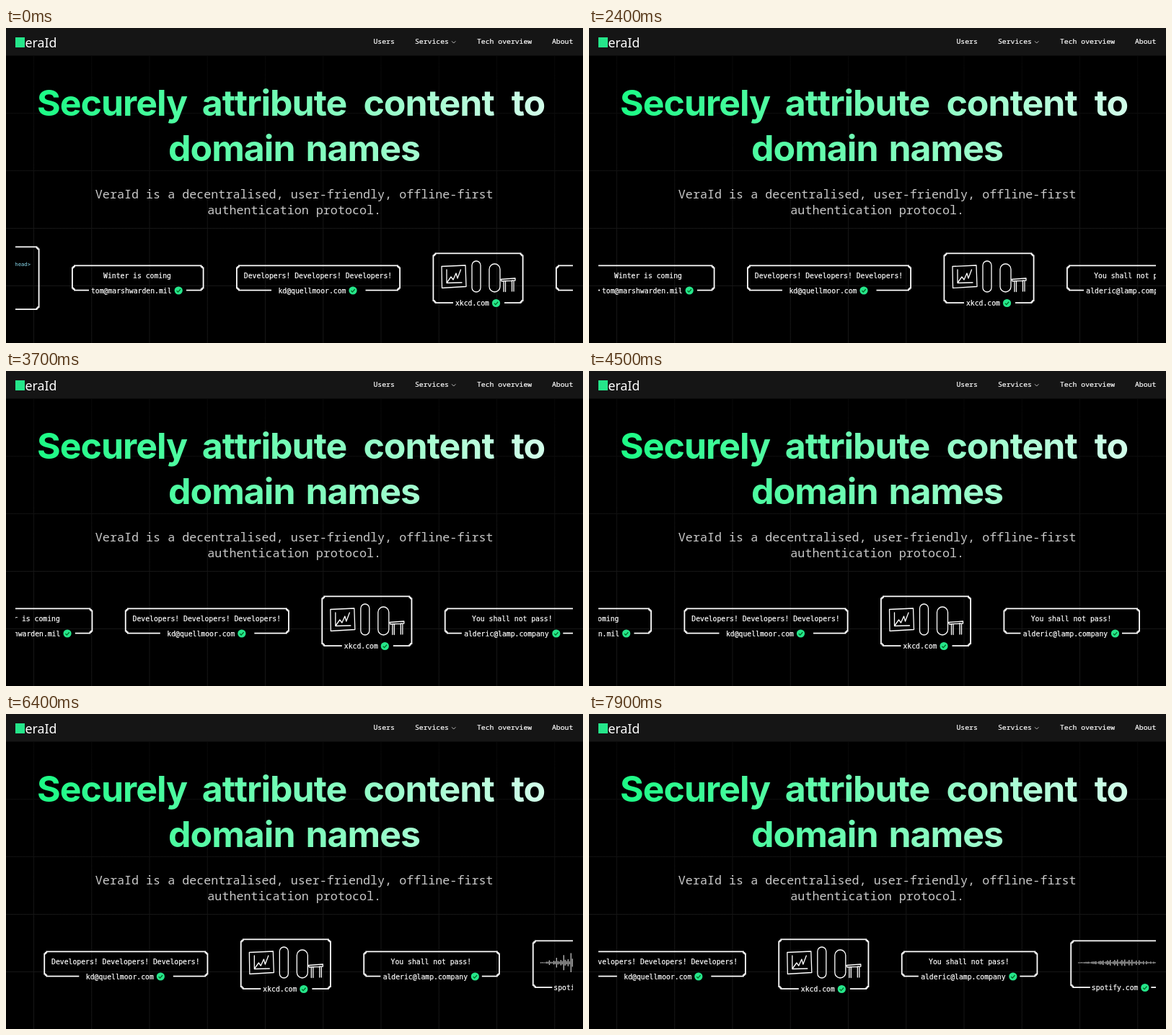
Animation, 800 px wide and 438 px high, one loop 8000 ms. Source, as an HTML page:

```html
<!DOCTYPE html>
<html lang="en">
<head>
<meta charset="utf-8">
<title>Protocol landing page</title>
<style>
  html, body { margin: 0; width: 100%; height: 100%; overflow: hidden; background: #000; }
  svg { display: block; width: 100%; height: 100%; }
  text { white-space: pre; }
  .nav { font: 500 9.78px "Noto Sans Mono", monospace; fill: #fff; stroke: #fff; stroke-width: .2; }
  .brand { font: 500 17.8px "Noto Sans", sans-serif; fill: #fff; }
  .title { font: 700 50px Inter, sans-serif; letter-spacing: -1px; word-spacing: 4px; fill: url(#mint); }
  .sub { font: 16.73px "Noto Sans Mono", monospace; fill: #c9c9c9; }
  .card { font: 9.76px "DejaVu Sans Mono", monospace; fill: #fff; stroke: #fff; stroke-width: .2; }
  .code { font: 7.2px "DejaVu Sans Mono", monospace; fill: #8adcf0; }
  .mid { text-anchor: middle; }
  .line { fill: none; stroke: #fff; stroke-width: 1.3; stroke-linecap: round; stroke-linejoin: round; }
  .frame { fill: none; stroke: #fff; stroke-width: 1.8; }
</style>
</head>
<body>
<svg viewBox="0 0 800 438">
  <defs>
    <linearGradient id="mint" gradientUnits="userSpaceOnUse" x1="50" y1="0" x2="750" y2="0">
      <stop stop-color="#1dfb86"/><stop offset="1" stop-color="#d2fdea"/>
    </linearGradient>
    <linearGradient id="fade" gradientUnits="userSpaceOnUse" x1="0" y1="39" x2="0" y2="290">
      <stop stop-color="#080808"/><stop offset="1" stop-color="#161616"/>
    </linearGradient>
    <clipPath id="strip"><rect x="13" y="290" width="773" height="120"/></clipPath>
  </defs>
  <rect width="800" height="438"/>
  <path id="grid" fill="none" stroke="url(#fade)"/>
  <rect width="800" height="38.5" fill="#151515"/>
  <rect x="13" y="13" width="13" height="14" fill="#25e68a"/>
  <text class="brand" x="26.5" y="26.6">eraId</text>
  <g class="nav">
    <text x="509.5" y="22">Users</text>
    <text x="567" y="22">Services</text>
    <text x="653" y="22">Tech overview</text>
    <text x="757" y="22">About</text>
  </g>
  <path d="M618 18.3l2.7 2.7 2.7-2.7" fill="none" stroke="#bbb"/>
  <g class="title mid">
    <text y="122"><tspan x="154.5">Securely</tspan> <tspan x="379.5">attribute</tspan> <tspan x="593.5">content</tspan> <tspan x="724">to</tspan></text>
    <text x="399.5" y="184.5">domain names</text>
  </g>
  <g class="sub mid">
    <text x="399.7" y="237">VeraId is a decentralised, user-friendly, offline-first</text>
    <text x="399.7" y="259">authentication protocol.</text>
  </g>
  <g clip-path="url(#strip)"><g id="track"></g></g>
</svg>
<script>
const LOOP = 8000, STEP = 100, SPEED = 1 / 24;
const $ = id => document.getElementById(id);

let grid = '';
for (let i = 0; i < 10; i++) grid += `M${38.5 + 80.25 * i} 39V438`;
for (let y = 118.5; y < 438; y += 80) grid += `M0 ${y}H800`;
$('grid').setAttribute('d', grid);

// Pixel-stepped border, open along the bottom between gapL and gapR
function frame(left, right, top, bottom, gapL, gapR) {
  const l = left + .9, r = right - .9, t = top + .9, b = bottom - .9;
  return `<path class="frame" d="M${gapR} ${b}H${r - 3}v-1.5h1.5v-1.5h1.5V${t + 3}h-1.5v-1.5h-1.5V${t}` +
    `H${l + 3}v1.5h-1.5v1.5h-1.5V${b - 3}h1.5v1.5h1.5V${b}H${gapL}"/>`;
}

const badge = (x, y) => `<circle cx="${x}" cy="${y}" r="5.6" fill="#25e68a"/>
  <path d="M${x - 2.6} ${y + .2}l1.9 1.9 3.4-3.8" fill="none" stroke="#062" stroke-width="1.3"/>`;

function card({ box, gap, label, at, tick, body }) {
  const bottom = box[3];
  return frame(...box, ...gap) + body +
    `<text class="card" x="${at}" y="${bottom + 3}">${label}</text>` + badge(tick, bottom - .5);
}

const quote = (x, s) => `<text class="card mid" x="${x}" y="348.3">${s}</text>`;

const sketch = `<g class="line">
  <path d="M604 331.5L637 330l1 29.5-33.5 2z"/>
  <path d="M611 336v18.5l21-.5M612 353l5-7 3 4 4-9 2 7 4.5-12"/>
  <rect x="646" y="324" width="12" height="43" rx="6"/>
  <rect x="670" y="328" width="15" height="39" rx="7.5"/>
  <path d="M686 349.5l20-1.5v3l-19 1zM690 352v14.5M692.5 352v14.5M701.5 351v15M704 351v15"/>
</g>`;

const cards = [
  { box: [91, 274.5, 329.5, 365.5], gap: [115, 250], label: 'tom@marshwarden.mil',
    at: 118, tick: 239.2, body: quote(182, 'Winter is coming') },
  { box: [319, 547, 329.5, 365.5], gap: [368, 498.5], label: 'kd@quellmoor.com',
    at: 377.5, tick: 481, body: quote(432.5, 'Developers! Developers! Developers!') },
  { box: [591.5, 717.5, 312.5, 383], gap: [620, 691], label: 'xkcd.com',
    at: 623, tick: 679.5, body: sketch },
  { box: [762, 951.5, 329.5, 365.5], gap: [786, 926.5], label: 'alderic@lamp.company',
    at: 789.3, tick: 917, body: quote(856, 'You shall not pass!') },
  { box: [996.5, 1135.5, 314.5, 381], gap: [1024, 1108.5], label: 'spotify.com',
    at: 1026, tick: 1100, body: '<path id="wave" stroke="#ccc" stroke-width="1.2"/>' }
];

$('track').innerHTML = frame(-130, 46.5, 303.5, 392, -20, -20) +
  '<text class="code" x="34" y="331" text-anchor="end">&lt;/head&gt;</text>' +
  cards.map(card).join('');

function wave(t) {
  const level = .66 + .34 * Math.cos((t - 6400) / 1500 * Math.PI);
  let d = '';
  for (let i = 0; i < 59; i++) {
    const swell = Math.sin(Math.PI * i / 58) ** 1.5;
    const beat = Math.abs(Math.sin(i * .62 + 1.2) * Math.cos(i * 1.9 + t / 1500));
    const h = .6 + 15 * level * swell * beat;
    d += `M${1008 + 2 * i} ${345.8 - h}v${2 * h}`;
  }
  return d;
}

const start = performance.now();
function draw(now) {
  const t = Math.floor(Math.max(0, now - start) % LOOP / STEP) * STEP;
  $('track').setAttribute('transform', `translate(${-t * SPEED})`);
  $('wave').setAttribute('d', wave(t));
  requestAnimationFrame(draw);
}
draw(start);
</script>
</body>
</html>
```
